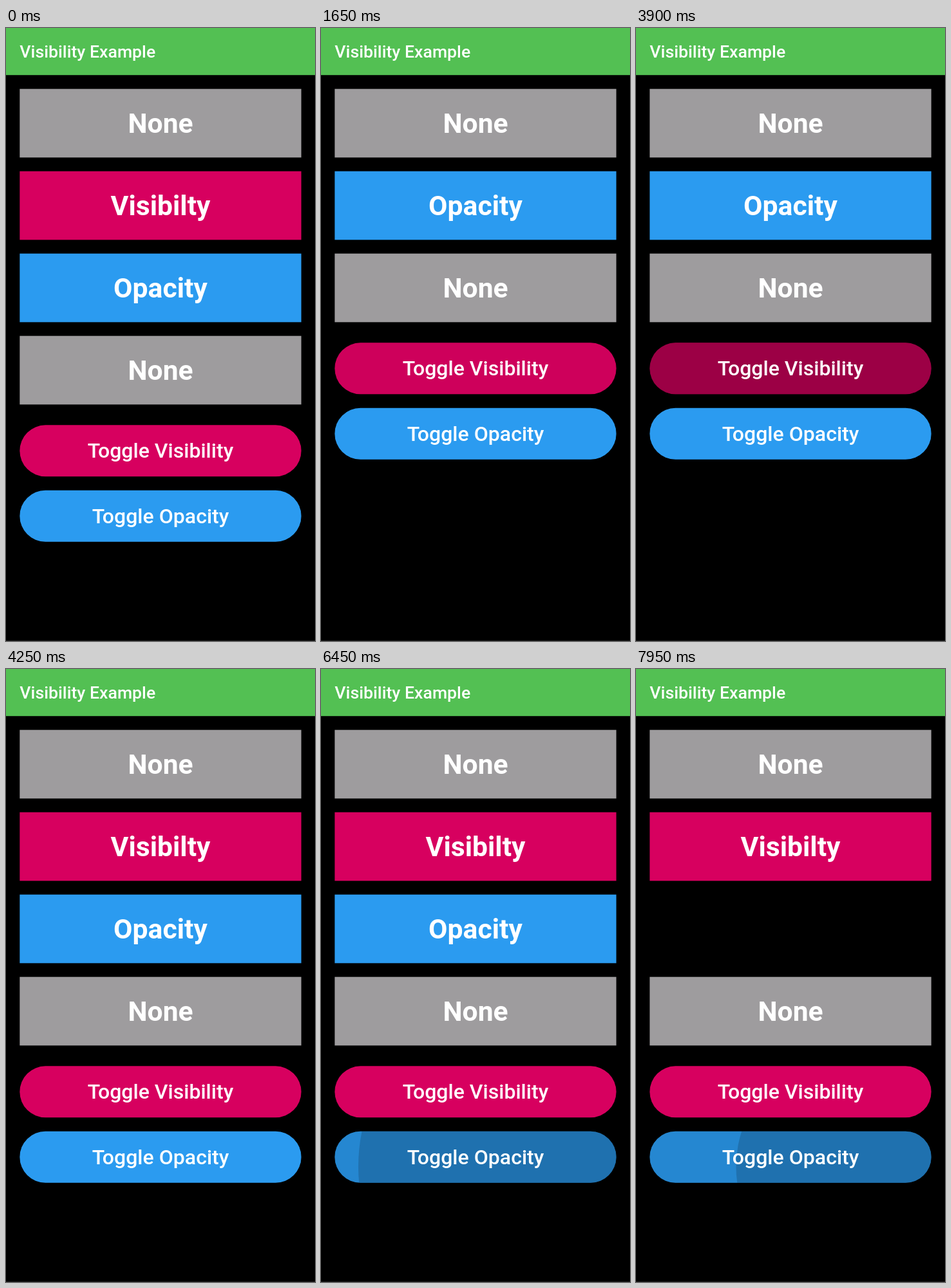
An HTML page with a canvas for the animation above (8 s loop, 480x953 px).

```html
<!DOCTYPE html>
<html lang="en">
<head>
<meta charset="utf-8">
<title>Visibility Example</title>
<style>
  html, body { margin: 0; width: 100%; height: 100%; overflow: hidden; background: #000; }
  canvas { display: block; width: 480px; height: 953px; }
</style>
</head>
<body>
<canvas id="stage" width="480" height="953"></canvas>
<script>
const ctx = document.getElementById('stage').getContext('2d');
const LOOP = 8000;
const DP = 4 / 3;
const LEFT = 16 * DP, WIDTH = 328 * DP;
const CARD_H = 80 * DP, BUTTON_H = 60 * DP, STEP = 96 * DP;
const FIRST_Y = 94.67;
const GREEN = '#53c053', GREY = '#9e9c9e', PINK = '#d7005f', BLUE = '#2b9bf0';
const FADE = 200, GROW = 1000;

// Touches: y is measured from the top of the button.
const presses = [
  { button: 'visibility', x: 351, y: 54, down: 420, up: 1480 },
  { button: 'visibility', x: 352, y: 43, down: 2798, up: 4035 },
  { button: 'opacity', x: 333, y: 55, down: 5582, up: 6690 },
  { button: 'opacity', x: 333, y: 55, down: 7390, up: 8500 }
];

const clamp = v => Math.max(0, Math.min(1, v));

function label(text, x, centerY, size, weight, align = 'center') {
  ctx.font = `${weight} ${size}px Roboto, sans-serif`;
  ctx.textAlign = align;
  ctx.fillStyle = '#fff';
  ctx.fillText(text, x, centerY + size * 0.342);
}

function card(text, color, y) {
  ctx.fillStyle = color;
  ctx.fillRect(LEFT, y, WIDTH, CARD_H);
  label(text, 240, y + CARD_H / 2, 32 * DP, 700);
}

function ink(press, top, t) {
  const age = t - press.down;
  const fade = 1 - clamp((t - press.up) / FADE);
  if (age < 0 || fade === 0) return;

  ctx.fillStyle = `rgba(0,0,0,${0.13 * clamp(age / FADE) * fade})`;
  ctx.fillRect(LEFT, top, WIDTH, BUTTON_H);

  const reach = Math.hypot(press.x - LEFT, Math.max(press.y, BUTTON_H - press.y));
  ctx.fillStyle = `rgba(0,0,0,${0.165 * fade})`;
  ctx.beginPath();
  ctx.arc(press.x, top + press.y, reach * clamp(age / GROW), 0, Math.PI * 2);
  ctx.fill();
}

function button(name, text, color, y, t) {
  ctx.save();
  ctx.beginPath();
  ctx.roundRect(LEFT, y, WIDTH, BUTTON_H, BUTTON_H / 2);
  ctx.fillStyle = color;
  ctx.fill();
  ctx.clip();
  presses.filter(p => p.button === name).forEach(p => ink(p, y, t));
  ctx.restore();
  label(text, 240, y + BUTTON_H / 2, 24 * DP, 500);
}

function isOn(name, t) {
  return presses.filter(p => p.button === name && t >= p.up).length % 2 === 0;
}

function draw(t) {
  ctx.fillStyle = '#000';
  ctx.fillRect(0, 0, 480, 953);
  ctx.fillStyle = '#1a1a1a';
  ctx.fillRect(0, 952, 480, 1);
  ctx.fillStyle = GREEN;
  ctx.fillRect(0, 0, 480, 73.2);
  label('Visibility Example', LEFT, 36.6, 20 * DP, 500, 'left');

  let y = FIRST_Y;
  card('None', GREY, y);
  y += STEP;
  if (isOn('visibility', t)) {
    card('Visibilty', PINK, y);
    y += STEP;
  }
  if (isOn('opacity', t)) card('Opacity', BLUE, y);
  y += STEP;
  card('None', GREY, y);
  y += CARD_H + 24 * DP;
  button('visibility', 'Toggle Visibility', PINK, y, t);
  y += BUTTON_H + 16 * DP;
  button('opacity', 'Toggle Opacity', BLUE, y, t);
}

const start = performance.now();
function tick() {
  draw((performance.now() - start) % LOOP);
  requestAnimationFrame(tick);
}
tick();
</script>
</body>
</html>
```
